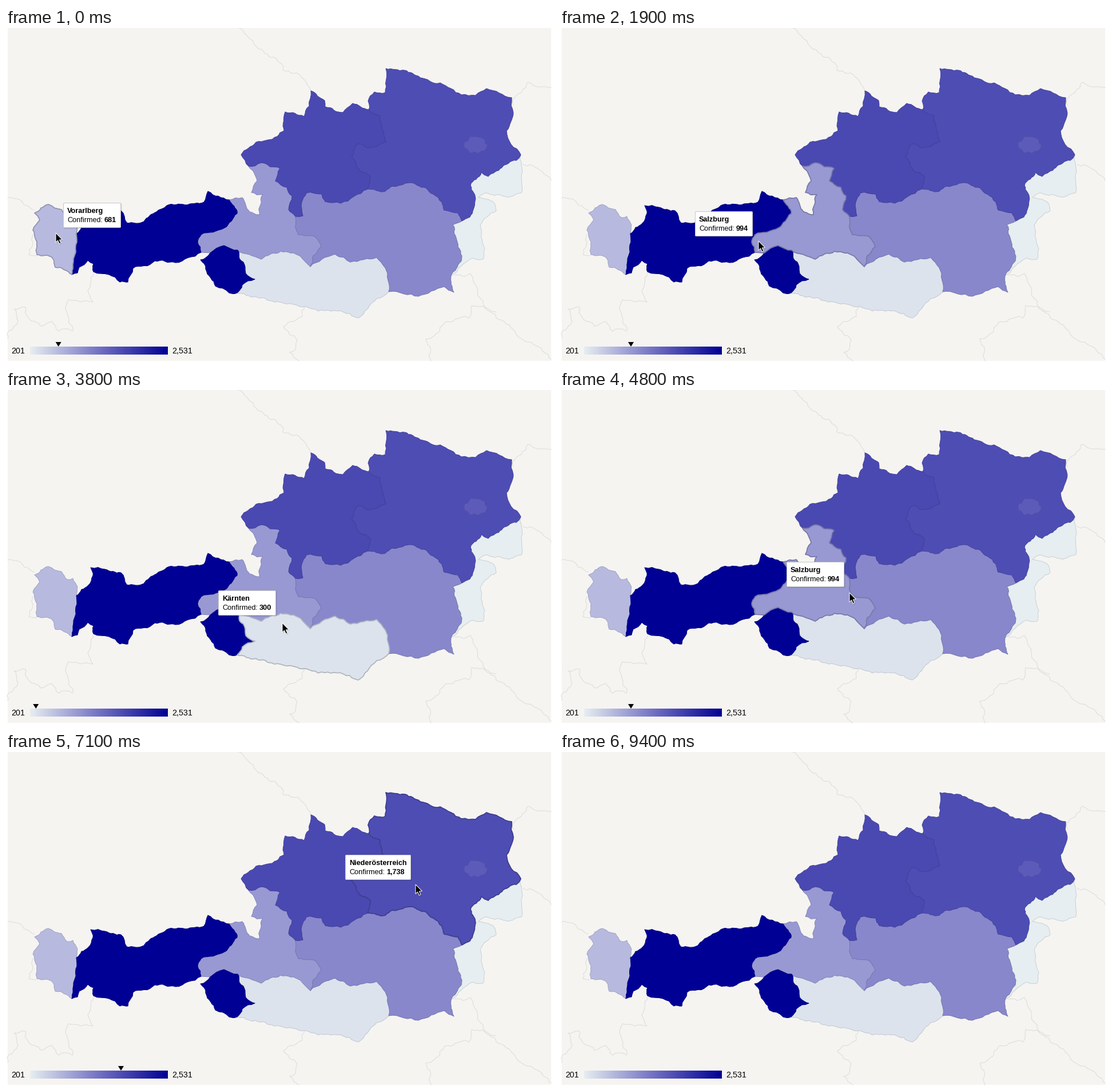
Recreate the animation shown at these times as a matplotlib script. Size 958 px wide and 585 px high, loop 10000 ms.

```python
import numpy as np
import matplotlib.pyplot as plt
from matplotlib.animation import FuncAnimation
from matplotlib.patches import FancyBboxPatch, PathPatch, Polygon, Rectangle
from matplotlib.path import Path

W, H, DPI = 958, 585, 64
FRAMES, STEP = 100, 100
PT = 72 / DPI  # points per pixel
LOW, HIGH = 201, 2531
BAR_X, BAR_W = 42, 241

rng = np.random.default_rng(4)
plt.rcParams["font.family"] = "Liberation Sans"


def arc(*xy, wiggle=.13, cap=2.5):
    """Border through key points, roughened by midpoint displacement."""
    pts = np.array(xy, float).reshape(-1, 2)
    while True:
        d = np.diff(pts, axis=0)
        size = np.hypot(*d.T)
        long = np.flatnonzero(size > 7)
        if not len(long):
            return pts
        normal = np.column_stack([-d[:, 1], d[:, 0]]) / np.maximum(size, 1)[:, None]
        push = rng.uniform(-1, 1, len(d)) * np.minimum(wiggle * size, cap)
        mid = (pts[:-1] + pts[1:]) / 2 + normal * push[:, None]
        pts = np.insert(pts, long + 1, mid[long], axis=0)


def ring(*arcs):
    return np.vstack(arcs)


def outline(rings):
    return Path.make_compound_path(*[Path(np.vstack([r, r[:1]])) for r in rings])


def shade(value):
    t = (value - LOW) / (HIGH - LOW)
    stops = zip((230, 238, 241), (115, 113, 195), (0, 0, 148))
    return np.stack([np.interp(t, (0, .5, 1), s) for s in stops], axis=-1) / 255


def marker_x(value):
    return BAR_X + (value - LOW) / (HIGH - LOW) * BAR_W


# Borders, named by the regions they part
vor_out = arc(115, 432, 86, 419, 82, 404, 54, 397, 54, 382, 47, 354, 59, 336, 50, 324,
              74, 309, 97, 318, 107, 332, 117, 330, 125, 345, 123, 360)
vor_tir = arc(123, 360, 122, 380, 118, 404, 115, 432)
tir_south = arc(115, 432, 125, 429, 128, 419, 143, 407, 153, 413, 153, 427, 180, 432,
                199, 445, 213, 445, 222, 421, 260, 408, 296, 411, 341, 393)
tir_north = arc(123, 360, 144, 342, 152, 325, 148, 311, 173, 314, 201, 320, 211, 341,
                241, 339, 263, 322, 281, 311, 346, 305, 353, 286, 390, 301)
tir_sal = arc(390, 301, 404, 325, 382, 350, 341, 362, 335, 375, 341, 393)
east_sal = arc(405, 389, 381, 381, 357, 394)
east_out = arc(357, 394, 340, 406, 358, 438, 366, 452, 390, 464, 404, 464)
east_kar = arc(404, 464, 413, 450, 435, 440, 419, 430, 418, 418, 408, 404, 405, 389)
sal_kar = arc(405, 389, 446, 405, 480, 391, 515, 400, 532, 418)
sal_ste = arc(532, 418, 537, 399, 551, 383, 541, 366, 511, 362, 508, 355, 506, 330)
sal_obe = arc(506, 330, 494, 318, 500, 294, 491, 279, 471, 268, 479, 246, 446, 236,
              424, 242)
sal_out = arc(424, 242, 439, 268, 429, 288, 449, 292, 443, 327, 426, 322, 413, 297,
              390, 301)
obe_out = arc(424, 242, 411, 222, 437, 200, 474, 190, 486, 180, 488, 147, 521, 155,
              530, 137, 533, 110, 557, 127, 558, 138, 589, 148, 606, 132, 634, 143)
obe_nie = arc(634, 143, 654, 154, 664, 199, 634, 210, 614, 203, 604, 226, 618, 250,
              637, 260, 632, 282)
obe_ste = arc(632, 282, 608, 295, 585, 307, 558, 304, 552, 291, 525, 289, 517, 305,
              519, 329, 506, 330)
nie_out = arc(634, 143, 633, 128, 644, 112, 663, 113, 664, 71, 697, 74, 724, 87,
              759, 96, 796, 117, 821, 118, 840, 106, 884, 122, 887, 149, 875, 180,
              883, 204, 900, 222)
nie_bur = arc(900, 222, 892, 232, 843, 260, 831, 253, 812, 276, 820, 303, 811, 331,
              797, 338)
nie_ste = arc(797, 338, 790, 324, 766, 319, 762, 305, 747, 291, 734, 280, 704, 271,
              676, 277, 663, 286, 632, 282)
bur_out = arc(900, 222, 903, 252, 901, 289, 871, 295, 838, 289, 826, 297, 853, 306,
              857, 320, 829, 345, 837, 386, 834, 405, 815, 403, 778, 434)
bur_ste = arc(797, 338, 781, 345, 789, 375, 796, 408, 778, 434)
ste_out = arc(778, 434, 783, 463, 766, 453, 721, 470, 669, 462)
kar_ste = arc(669, 462, 663, 420, 648, 402, 602, 410, 575, 396, 532, 418)
kar_out = arc(669, 462, 648, 474, 632, 492, 616, 508, 601, 500, 557, 495, 469, 480,
              404, 464)
turn = np.linspace(0, 2 * np.pi, 10)
wien = arc(*np.column_stack([821 + 21 * np.cos(turn), 205 + 15 * np.sin(turn)]).flat,
           wiggle=.25)

# name: (value, rings)
regions = {
    "Vorarlberg": (681, [ring(vor_out, vor_tir)]),
    "Burgenland": (201, [ring(bur_out, bur_ste[::-1], nie_bur[::-1])]),
    "Kärnten": (300, [ring(kar_out, east_kar, sal_kar, kar_ste[::-1])]),
    "Salzburg": (994, [ring(sal_kar, sal_ste, sal_obe, sal_out, tir_sal,
                            east_sal[::-1])]),
    "Steiermark": (1158, [ring(bur_ste, ste_out, kar_ste, sal_ste, obe_ste[::-1],
                               nie_ste[::-1])]),
    "Niederösterreich": (1738, [ring(nie_out, nie_bur, nie_ste, obe_nie[::-1])]),
    "Oberösterreich": (1781, [ring(obe_out, obe_nie, obe_ste, sal_obe)]),
    "Tirol": (2531, [ring(tir_north, tir_sal, tir_south[::-1], vor_tir[::-1]),
                     ring(east_sal, east_out, east_kar)]),
    "Wien": (1590, [wien]),
}

# Lines of the neighbouring countries
neighbours = [
    (406, 0, 426, 19, 442, 37, 472, 53, 484, 74, 520, 89, 533, 110),
    (3, 298, 18, 299, 49, 319),
    (47, 362, 40, 397, 53, 399),
    (153, 430, 143, 460, 152, 480, 109, 476, 107, 498, 116, 531, 92, 531, 80, 514,
     60, 522, 38, 506, 34, 489, 14, 492, 18, 520, 3, 544),
    (522, 487, 518, 505, 485, 523, 509, 546, 496, 568, 512, 583),
    (743, 583, 734, 545, 785, 510, 809, 508, 814, 486, 833, 487, 857, 508, 890, 532,
     928, 557, 953, 580),
    (784, 433, 812, 430, 824, 455, 834, 478, 856, 497),
    (887, 135, 892, 118, 913, 95, 953, 104),
    (904, 239, 918, 240, 953, 267),
]

# Pointer: time, x, y; frames within a pause repeat its first one
keys = np.array([(100, 87, 359), (500, 130, 368), (1100, 223, 354), (1500, 311, 371),
                 (1900, 347, 373), (2700, 395, 413), (3200, 430, 424), (3800, 483, 408),
                 (4000, 487, 380), (4800, 506, 355), (5300, 560, 345), (6100, 606, 244),
                 (6200, 600, 216), (7300, 742, 236), (8200, 847, 229), (8500, 867, 268),
                 (9000, 867, 268), (9400, 897, -30)])
pauses = [(1500, 1600), (4000, 4300), (5300, 5400), (6100, 6200), (8500, 9000)]


def pointer(t):
    return [float(np.interp(t, keys[:, 0], col)) for col in keys[:, 1:].T]


def hovered(t):
    spot = pointer(t - 50)
    hits = [name for name, (_, rings) in regions.items()
            if any(Path(r).contains_point(spot) for r in rings)]
    return hits[-1] if hits else None


fig = plt.figure(figsize=(W / DPI, H / DPI), dpi=DPI, facecolor="white")
ax = fig.add_axes([0, 0, 1, 1])
ax.axis("off")
ax.add_patch(Rectangle((3, 0), 950, 583, fc="#f5f4f1", lw=0))
for line in neighbours:
    ax.plot(*arc(*line, wiggle=.2, cap=5).T, color="#dcdcdb", lw=PT, zorder=2)
for value, rings in regions.values():
    ax.add_patch(PathPatch(outline(rings), fc=shade(value), ec=shade(value) * .88,
                           lw=PT, joinstyle="round", zorder=3))
ax.imshow(shade(np.linspace(LOW, HIGH, BAR_W))[None], aspect="auto", zorder=4,
          extent=(BAR_X, BAR_X + BAR_W, 572, 558))
ax.set(xlim=(0, W), ylim=(H, 0))


def label(size, weight="normal", x=0, y=0, text=""):
    return ax.text(x, y, text, size=size * PT, weight=weight, color="black",
                   va="baseline", ha="left", zorder=8)


def panel(**style):
    return ax.add_patch(FancyBboxPatch((0, 0), 100, 43, zorder=7,
                                       boxstyle="round,pad=0,rounding_size=1.5", **style))


label(14.2, x=9.5, y=570, text=f"{LOW}")
label(14.2, x=290.5, y=570, text=f"{HIGH:,}")

edge = ax.add_patch(PathPatch(outline([wien]), fc="none", lw=1.7 * PT,
                              joinstyle="round", zorder=5))
marker = ax.add_patch(Polygon([(0, 0)] * 3, fc="black", lw=0, zorder=6))
shadow = panel(fc="black", alpha=.12, lw=0)
box = panel(fc="white", ec="#c6c6c6", lw=PT)
title = label(12.6, "bold")
caption = label(12.6, text="Confirmed:")
count = label(12.6, "bold")
tip = [edge, marker, shadow, box, title, caption, count]

ARROW = np.array([(0, 0), (0, 16.5), (3.6, 13), (6.3, 19), (9, 17.8), (6.4, 12),
                  (11.5, 11.8)])
cast = ax.add_patch(Polygon(ARROW, fc="black", alpha=.18, lw=0, zorder=9))
arrow = ax.add_patch(Polygon(ARROW, fc="black", ec="white", lw=PT, zorder=10))


def place_tip(name, x, y):
    value, rings = regions[name]
    edge.set_path(outline(rings))
    edge.set_edgecolor(shade(value) * .8)
    mx = marker_x(value)
    marker.set_xy([(mx - 5, 550), (mx + 5, 550), (mx, 558)])

    title.set_text(name)
    count.set_text(f"{value:,}")
    width = 15 + round(max(title.get_window_extent().width,
                           65 + count.get_window_extent().width))
    left, top = round(x) - 12 - width, round(y) - 53
    if left < 3:
        left = round(x) + 13
    box.set_bounds(left + .5, top + .5, width - 1, 43)
    shadow.set_bounds(left + 1, top + 1, width + .5, 44.5)
    title.set_position((left + 7, top + 18))
    caption.set_position((left + 7, top + 34))
    count.set_position((left + 72, top + 34))


def draw(i):
    t = i * STEP
    for start, end in pauses:
        if start <= t <= end:
            t = start
    spot = np.round(pointer(t))
    arrow.set_xy(ARROW + spot)
    cast.set_xy(ARROW + spot + 1.5)

    name = hovered(t)
    for part in tip:
        part.set_visible(name is not None)
    if name:
        place_tip(name, *pointer(t + 30))  # the tooltip runs a little ahead
    return tip


anim = FuncAnimation(fig, draw, frames=FRAMES, interval=STEP, repeat=True,
                     repeat_delay=0, blit=False)
plt.show()
```
